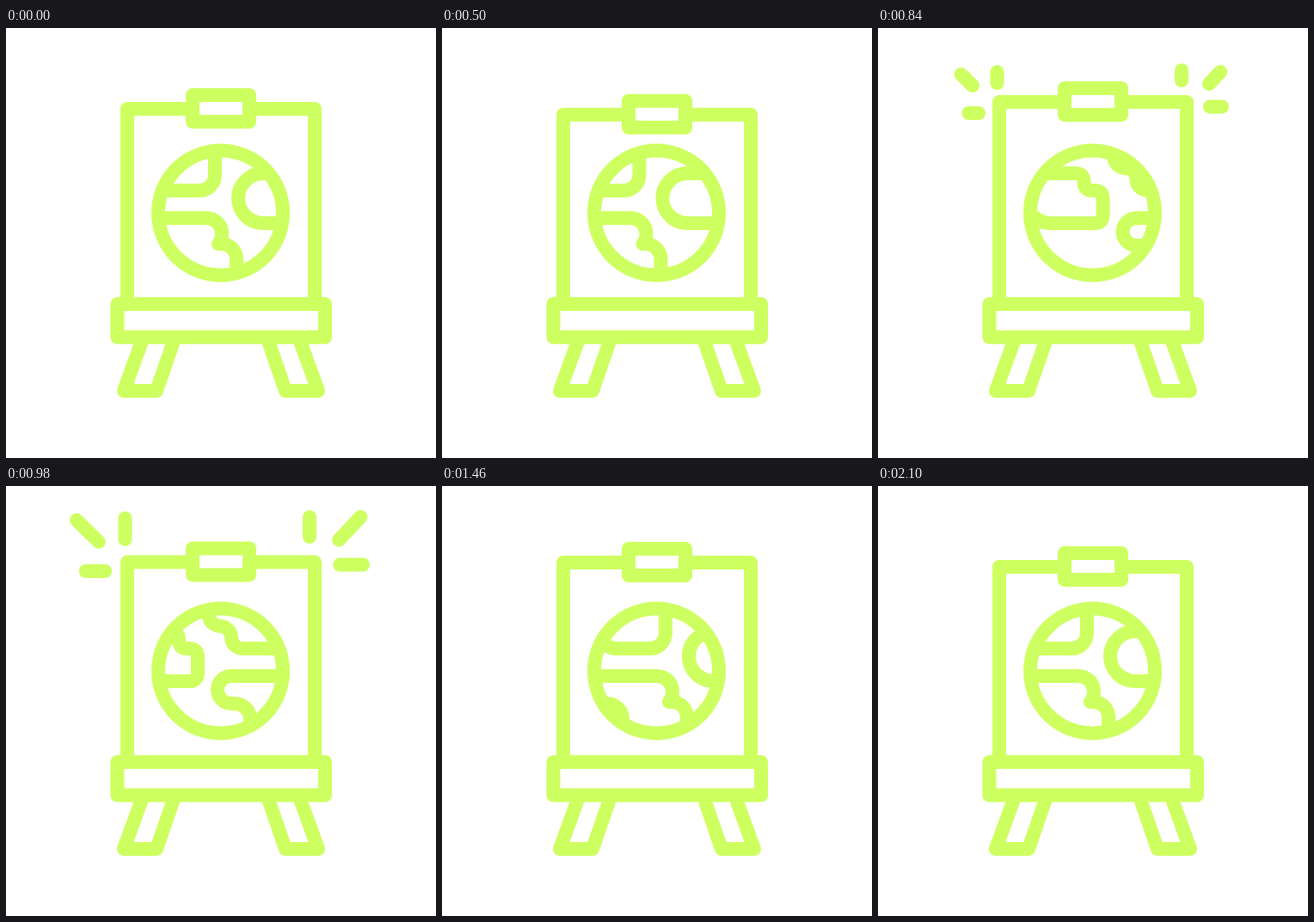
An HTML page that plays this animation: 500 by 500 pixels, repeating every 2.4 s.

```html
<!DOCTYPE html>
<html lang="en">
<head>
<meta charset="utf-8">
<title>Globe on an easel</title>
<style>
  html, body { margin: 0; width: 100%; height: 100%; overflow: hidden; background: #fff; }
  svg { display: block; width: 100%; height: 100%; }
</style>
</head>
<body>
<svg viewBox="0 0 500 500" fill="none" stroke="#ceff60" stroke-width="16"
     stroke-linecap="round" stroke-linejoin="round">
  <defs>
    <clipPath id="disc"><circle cx="249.5" cy="215" r="73"/></clipPath>
    <g id="lands">
      <path d="M145 130V150A13 13 0 0 0 158 163A13 13 0 0 1 171 176A13 13 0 0 0 184 189H225A18 18 0 0 0 243 171V130"/>
      <path d="M193 300V271A18 18 0 0 0 175 253H171A16 16 0 0 1 171 221H233A18 18 0 0 1 251 239Q251 247 247 251H250A18 18 0 0 1 268 271V300"/>
      <path d="M299 169A29 29 0 0 0 299 227H350Q360 227 360 217V199Q360 189 350 189H348Q338 189 338 179Q338 169 328 169Z"/>
    </g>
    <path id="leg" d="M157 367L137 422H175L194 367"/>
  </defs>
  <path id="board"/>
  <path id="clip" fill="#fff"/>
  <g clip-path="url(#disc)">
    <g id="map"><use href="#lands"/><use href="#lands" x="228"/></g>
  </g>
  <circle cx="249.5" cy="215" r="72.5"/>
  <use href="#leg"/>
  <use href="#leg" transform="translate(500) scale(-1 1)"/>
  <rect x="129.5" y="321" width="241.5" height="38.5" fill="#fff"/>
  <g id="rays">
    <path pathLength="1" d="M110 67L65 23"/>
    <path pathLength="1" d="M138.5 64V21"/>
    <path pathLength="1" d="M117 99H78"/>
    <path pathLength="1" d="M353 61V21"/>
    <path pathLength="1" d="M385 65L429 18"/>
    <path pathLength="1" d="M386 91.5H433"/>
  </g>
</svg>
<script>
const LOOP = 2400, SPIN = 2100, MAP_WIDTH = 228;
const HOP = 410, HOPS = [0, 8, -8, 0, -8, 0];
const el = id => document.getElementById(id);

const progress = (t, from, to) => Math.min(1, Math.max(0, (t - from) / (to - from)));
const smooth = s => s * s * (3 - 2 * s);
const smoother = s => s ** 3 * (10 - 15 * s + 6 * s * s);

// Quartic start and cubic finish, joined at equal speed
function spinEase(s) {
  const join = .355;
  const part = 3 * join / (3 * join + 4 * (1 - join));
  return s < join ? part * (s / join) ** 4
                  : 1 - (1 - part) * ((1 - s) / (1 - join)) ** 3;
}

function boardTop(t) {
  const i = Math.min(Math.floor(t / HOP), HOPS.length - 2);
  const s = smoother(progress(t, i * HOP, (i + 1) * HOP));
  return 94 + HOPS[i] + (HOPS[i + 1] - HOPS[i]) * s;
}

function drawRays(t) {
  const head = smooth(progress(t, 610, 1250));
  const tail = smooth(progress(t, 940, 1250));
  const style = el('rays').style;
  style.display = head > tail ? '' : 'none';
  style.strokeDasharray = `${head - tail} 2`;
  style.strokeDashoffset = -tail;
}

function draw(t) {
  const top = boardTop(t);
  const shift = MAP_WIDTH * spinEase(progress(t, 0, SPIN));
  el('board').setAttribute('d', `M141 321V${top}H359V321`);
  el('clip').setAttribute('d', `M217 ${top - 16}H283v31H217Z`);
  el('map').setAttribute('transform', `translate(${-shift})`);
  drawRays(t);
}

const start = performance.now();
function tick() {
  draw((performance.now() - start) % LOOP);
  requestAnimationFrame(tick);
}
tick();
</script>
</body>
</html>
```
